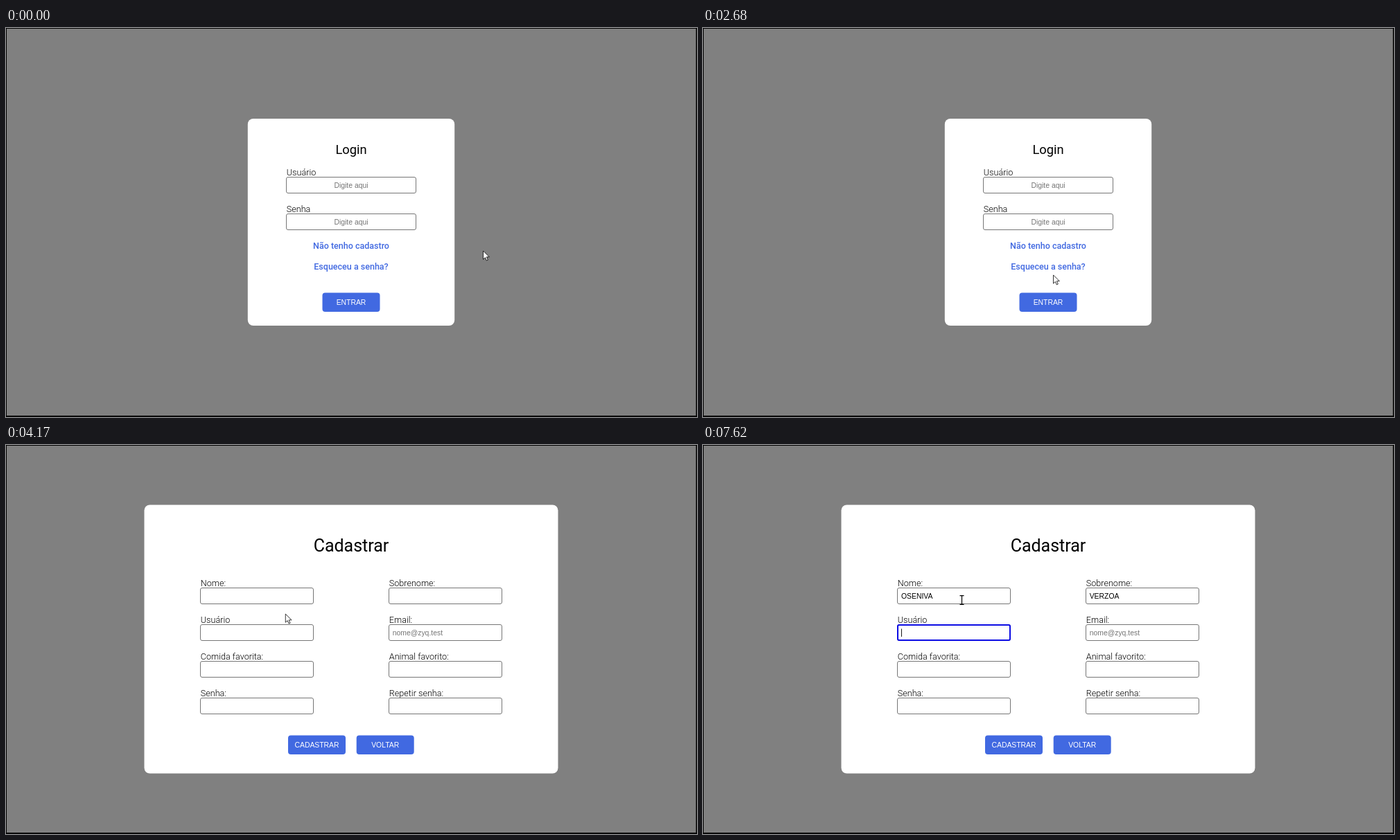
Write an HTML page that moves like this. It is 997 px wide and 562 px high and loops after 8 s.

```html
<!DOCTYPE html>
<html lang="pt-BR">
<head>
<meta charset="utf-8">
<title>Login</title>
<style>
  html, body { margin: 0; width: 100%; height: 100%; overflow: hidden; background: #000; }
  svg { display: block; }
  text { white-space: pre; }
  .label { font: 300 12.6px Roboto, sans-serif; }
  .title { font: 400 18.3px Roboto, sans-serif; }
  .big { font-size: 25px; }
  .link { font: 500 12.5px Roboto, sans-serif; fill: #4169e1; }
  .ui { font: 10.4px "Liberation Sans", Arial, sans-serif; }
  .hint { fill: #757575; }
  .mid { text-anchor: middle; }
  .field { fill: #fff; stroke: #767676; }
  .error .field { stroke: #f00; }
  .button rect { fill: #4169e1; }
  .button text { fill: #fff; }
  .link.hover, .button.hover rect { fill: #6990e9; }
  #focus { fill: none; stroke: #0c0ce4; stroke-width: 2; }
  #cursor { fill: #fff; stroke: #000; stroke-width: .8; stroke-linejoin: round; }
</style>
</head>
<body>
<svg width="997" height="562" viewBox="0 0 997 562">
  <rect x="1" y="1" width="994.5" height="559" fill="#808080"/>
  <g id="login"></g>
  <g id="signup"></g>
  <path id="cursor"/>
</svg>
<script>
const LOOP = 8000;
const $ = id => document.getElementById(id);

const text = (x, y, cls, str, id = '') => `<text id="${id}" x="${x}" y="${y}" class="${cls}">${str}</text>`;
const box = (x, y, w, h, r, attrs) => `<rect x="${x}" y="${y}" width="${w}" height="${h}" rx="${r}" ${attrs}/>`;
const button = (x, y, str, id) => `<g class="button" id="${id}">` +
  box(x, y, 83, 27.5, 4, '') + text(x + 41.5, y + 17.4, 'ui mid', str) + '</g>';
const field = (x, y, w, label) =>
  text(x + .3, y - 2.5, 'label', label) + box(x, y, w, 23, 2.5, 'class="field"');

const LEFT = 280.5, RIGHT = 552.5, TOP = 206.5, ROW = 53;

$('login').innerHTML =
  box(348.8, 131, 298.4, 299, 8, 'fill="#fff"') +
  text(498, 182, 'title mid', 'Login') +
  ['Usuário', 'Senha'].map((label, i) =>
    field(404.5, 215.5 + i * ROW, 187, label) +
    text(498, 230.8 + i * ROW, 'ui hint mid', 'Digite aqui')).join('') +
  text(498, 318.5, 'link mid', 'Não tenho cadastro', 'register') +
  text(498, 348.5, 'link mid', 'Esqueceu a senha?', 'forgot') +
  button(456.5, 382.5, 'ENTRAR', 'enter');

$('signup').innerHTML =
  box(199.5, 86.5, 597, 388, 8, 'fill="#fff"') +
  text(498, 154, 'title big mid', 'Cadastrar') +
  [['Nome:', 'Sobrenome:'], ['Usuário', 'Email:'],
   ['Comida favorita:', 'Animal favorito:'], ['Senha:', 'Repetir senha:']].map(([a, b], i) =>
    field(LEFT, TOP + i * ROW, 163, a) + field(RIGHT, TOP + i * ROW, 163, b)).join('') +
  text(RIGHT + 5.2, 275, 'ui hint', 'nome@zyq.test') +
  box(0, 0, 162, 22, 2, 'id="focus"') +
  text(LEFT + 5.5, 222, 'ui', '', 'first') +
  text(RIGHT + 5.2, 222, 'ui', '', 'last') +
  text(LEFT + 5.5, 275, 'ui', '', 'user') +
  box(0, 0, .9, 11.5, 0, 'id="caret"') +
  button(407, 419.5, 'CADASTRAR', 'save') + button(505.7, 419.5, 'VOLTAR', 'back');

// Each entry: when the field gets focus, where it is, and when each key is pressed.
const entries = [
  { id: 'first', at: 4410, x: LEFT, y: TOP, str: 'OSENIVA', keys: [4810, 4980, 5080, 5180, 5330, 5480, 5580] },
  { id: 'last', at: 5890, x: RIGHT, y: TOP, str: 'VERZOA', keys: [6190, 6340, 6500, 6610, 6810, 7110] },
  { id: 'user', at: 7620, x: LEFT, y: TOP + ROW, str: '', keys: [] }
];

const shapes = {
  arrow: 'M0 0V12.2L2.9 9.6 4.8 14 6.8 13.1 4.9 8.8H8.8Z',
  hand: 'M-1.3.9Q0-.6 1.3.9V5.5Q2.8 4.6 3.7 6Q5.2 5.3 6 6.8Q7.2 6.4 7.2 8V11Q7 13 6 15.5H-.6Q-1.6 12.8-4.4 9.6Q-4.4 7.6-1.3 9.6Z',
  beam: 'M-3-6.3H3M0-6.3V6.3M-3 6.3H3'
};

// Pointer path: time, x, y
const path = [
  [440, 688.5, 322], [620, 645, 332], [850, 580, 344], [1050, 500, 333], [1210, 455, 328],
  [1400, 470, 352], [1600, 498, 396], [2490, 498, 396], [2680, 505.5, 357],
  [2900, 503, 334], [3200, 498, 312.5], [3700, 498, 312.5], [4000, 452, 280],
  [4200, 395, 238], [4410, 373.5, 224]
];

function pointerAt(t) {
  const i = path.findIndex(p => p[0] > t);
  if (i < 1) return path.at(i).slice(1);
  const [t0, x0, y0] = path[i - 1], [t1, x1, y1] = path[i];
  const k = (t - t0) / (t1 - t0);
  return [x0 + (x1 - x0) * k, y0 + (y1 - y0) * k];
}

const inside = (x, y, l, t, r, b) => x >= l && x <= r && y >= t && y <= b;
const show = (el, on) => el.setAttribute('visibility', on ? 'visible' : 'hidden');
function place(el, x, y) { el.setAttribute('x', x); el.setAttribute('y', y); }

function drawForm(t) {
  let active;
  for (const e of entries) {
    $(e.id).textContent = e.str.slice(0, e.keys.filter(k => k <= t).length);
    if (t >= e.at) active = e;
  }
  show($('focus'), active);
  show($('caret'), active);
  if (!active) return;
  const label = $(active.id);
  const width = label.textContent ? label.getComputedTextLength() : 0;
  place($('focus'), active.x + .5, active.y + .5);
  place($('caret'), +label.getAttribute('x') + width, active.y + 6);
}

function draw(t) {
  const [x, y] = pointerAt(t);
  const onLogin = t < 3500;
  $('login').style.display = onLogin ? '' : 'none';
  $('signup').style.display = onLogin ? 'none' : '';
  $('login').classList.toggle('error', t >= 1870 && t < 2390);

  const hovers = {
    register: inside(x, y, 443, 307, 553, 322),
    forgot: inside(x, y, 443, 337, 553, 352),
    enter: inside(x, y, 456, 382, 540, 410)
  };
  for (const id in hovers) $(id).classList.toggle('hover', hovers[id]);

  let shape = 'arrow';
  if (t < 3350 && Object.values(hovers).some(Boolean)) shape = 'hand';
  if (!onLogin) {
    drawForm(t);
    if (inside(x, y, LEFT, TOP, 444, 230)) shape = 'beam';
  }
  $('cursor').setAttribute('d', shapes[shape]);
  $('cursor').setAttribute('transform', `translate(${x} ${y})`);
  $('cursor').style.strokeWidth = shape === 'beam' ? 1.2 : .8;
}

function tick() {
  draw(performance.now() % LOOP);
  requestAnimationFrame(tick);
}
tick();
</script>
</body>
</html>
```
